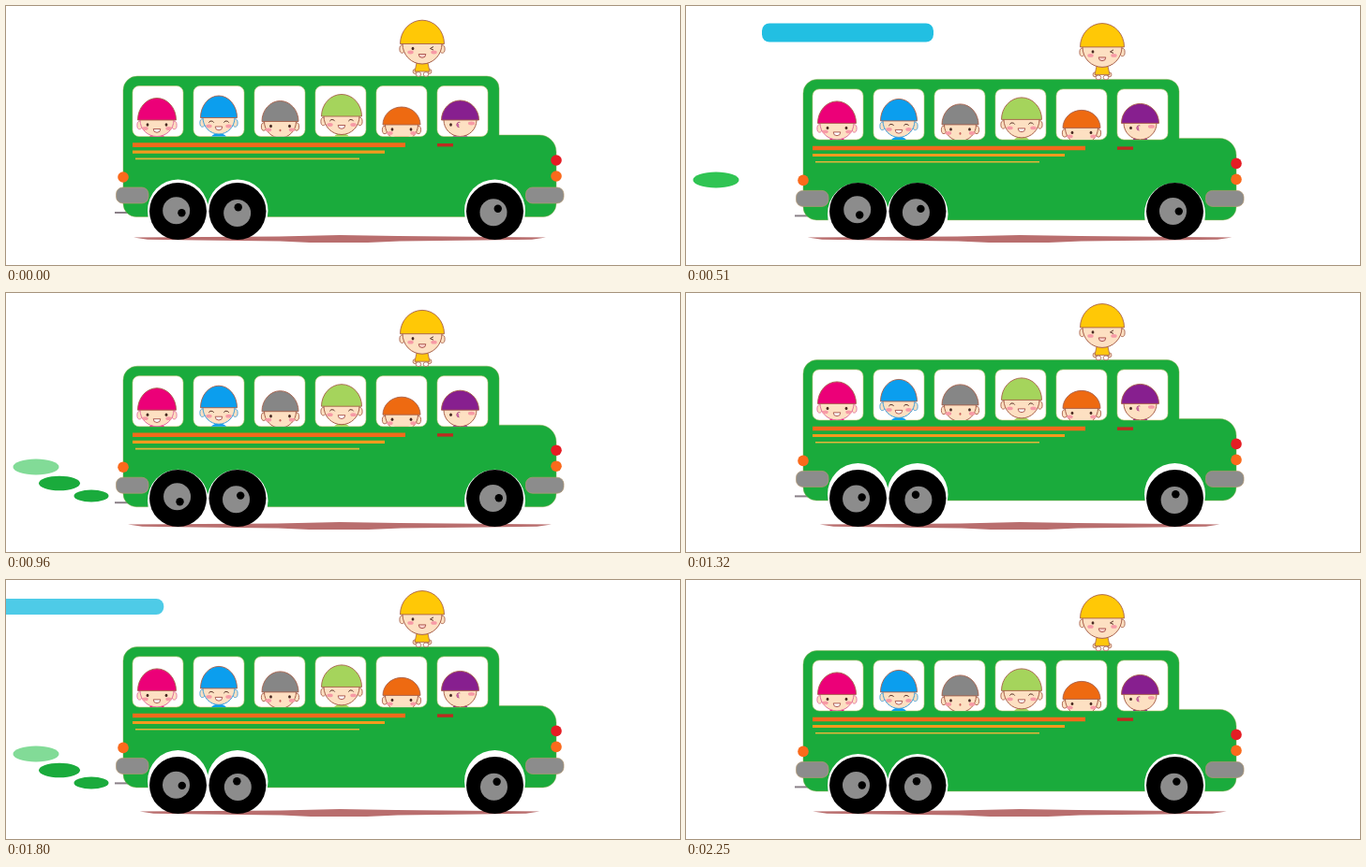
Recreate the animation shown at these times as an HTML page with a canvas. Size 719 px wide and 277 px high, loop 2280 ms.

```html
<!DOCTYPE html>
<html lang="en">
<head>
<meta charset="utf-8">
<title>Bus ride</title>
<style>
html, body { margin: 0; width: 100%; height: 100%; overflow: hidden; background: #fff; }
canvas { display: block; width: 719px; height: 277px; }
</style>
</head>
<body>
<canvas id="stage" width="719" height="277"></canvas>
<script>
const ctx = document.getElementById('stage').getContext('2d');
const STEP = 30, STEPS = 76, BOUNCE = 19, TAU = Math.PI * 2;
const GREEN = '#1aab3c', LINE = '#a8604a', SKIN = '#fde0c2', GREY = '#8c8c8c';

// [step within a bounce, vertical offset]
const BOUNCES = [[0, 0], [1.5, -3], [3, -3.6], [6, -3.6], [7, -3.2], [10, 2], [13, 3.2], [17, 3.4], [18, .4], [19, 0]];
const PUFF_STARTS = [0, 23, 51];
// x, y, half width, half height, fade-in start, fade-out end, colour
const PUFFS = [
  [91, 217, 18.5, 6.5, 1, 13, GREEN],
  [57, 203.5, 22, 7.8, 3, 16, GREEN],
  [32, 186, 24.5, 8.5, 6, 18, '#30c453']
];
// step at which each streak is at x = 81
const STREAKS = [17, 58.55];
const WHEELS = [[183.5, 62], [247, -42], [521.5, -3]];

const clamp = v => Math.max(0, Math.min(1, v));

function along(table, p) {
  const i = table.findIndex(row => row[0] > p);
  const [a, u] = table[i - 1], [b, v] = table[i];
  return u + (v - u) * (p - a) / (b - a);
}

function paint(fill, stroke, width = 1) {
  if (fill) { ctx.fillStyle = fill; ctx.fill(); }
  if (stroke) { ctx.strokeStyle = stroke; ctx.lineWidth = width; ctx.stroke(); }
}

function oval(x, y, rx, ry, fill, stroke, width) {
  ctx.beginPath();
  ctx.ellipse(x, y, rx, ry, 0, 0, TAU);
  paint(fill, stroke, width);
}

function box(x, y, w, h, r, fill, stroke, width) {
  ctx.beginPath();
  ctx.roundRect(x, y, w, h, r);
  paint(fill, stroke, width);
}

function polygon(points, fill, stroke, width) {
  ctx.beginPath();
  points.forEach(p => ctx.lineTo(...p));
  ctx.closePath();
  paint(fill, stroke, width);
}

function curve(x, y, r, from, to, stroke, width) {
  ctx.beginPath();
  ctx.arc(x, y, r, from * Math.PI, to * Math.PI);
  paint(null, stroke, width);
}

function smile(x, y, r, fill) {
  ctx.beginPath();
  ctx.arc(x, y, r, 0, Math.PI);
  ctx.closePath();
  paint(fill, '#9c3b35', .8);
}

const eye = {
  dot: (x, y) => oval(x, y, 1.4, 1.7, '#4a2a22'),
  happy: (x, y) => curve(x, y + 1.5, 3, 1.15, 1.85, '#5b352a', 1),
  wink(x, y) {
    ctx.beginPath();
    ctx.moveTo(x + 2, y - 2);
    ctx.lineTo(x - 1.5, y);
    ctx.lineTo(x + 2, y + 1.5);
    paint(null, '#5b352a', 1);
  }
};

const mouths = {
  smile: (x, y) => smile(x, y, 3.8, '#fff'),
  laugh: (x, y) => smile(x, y + 1.5, 3.8, '#fbd3cd'),
  small: (x, y) => oval(x, y, 1, 1.3, '#c9625a'),
  none() {}
};

function frontFace({ x, brim, eyes = ['dot', 'dot'], mouth = 'smile', gap = 10 }) {
  for (const side of [-1, 1]) oval(x + side * (gap + 2.5), brim + 9, 3.2, 1.9, '#f79aa6');
  eye[eyes[0]](x - gap, brim + 5);
  eye[eyes[1]](x + gap, brim + 5);
  mouths[mouth](x, brim + 9.5);
}

function sideFace({ x, brim }) {
  oval(x - 10, brim + 5, 1.4, 1.7, '#4a2a22');
  oval(x + 12, brim + 3.5, 3.6, 1.9, '#f79aa6');
  curve(x - 1, brim + 5, 2.6, .5, 1.6, '#a33a78', 1);
  oval(x - 2.5, brim + 5.5, 1.3, 1.8, '#c965a0');
}

function kid(k) {
  const { x, top, brim, half, cap, strap = LINE, chin = 17.5, face = frontFace } = k;
  if (face === frontFace) {
    for (const side of [-1, 1]) oval(x + side * (half - 2), brim + 5.5, 2.6, 4.2, SKIN, strap, .9);
  }
  oval(x, brim, half - 2.5, chin, SKIN, strap, 1);
  face(k);
  ctx.beginPath();
  ctx.ellipse(x, brim, half, brim - top, 0, Math.PI, TAU);
  ctx.closePath();
  paint(cap, LINE, .9);
}

const RIDERS = [
  { x: 161, top: 98.5, brim: 122, half: 20.5, cap: '#ec0078', strap: '#e0709c' },
  { x: 227, top: 96, brim: 119.5, half: 19.5, cap: '#0b9eee', strap: '#3f9fd8', eyes: ['happy', 'happy'], gap: 8 },
  { x: 292.5, top: 101.5, brim: 123.5, half: 19.5, cap: '#868686', mouth: 'small' },
  { x: 358, top: 94.5, brim: 118, half: 21.5, cap: '#a5d45c', eyes: ['happy', 'happy'], chin: 19.5 },
  { x: 422, top: 108, brim: 127, half: 20, cap: '#ee6a11', mouth: 'none' },
  { x: 484.5, top: 101, brim: 122, half: 20, cap: '#871f8f', face: sideFace }
];

function roofKid() {
  for (const side of [-1, 1]) {
    oval(444 + side * 8, 70, 1.9, 2.4, SKIN, LINE, .8);
    oval(444 + side * 4, 73, 2.8, 2.4, '#fff', LINE, .8);
  }
  polygon([[438, 61], [450, 61], [452, 70], [436, 70]], '#fdc70c', LINE, .8);
  kid({ x: 444, top: 15.2, brim: 40.5, half: 23.5, cap: '#ffc806', chin: 21.5, eyes: ['dot', 'wink'], mouth: 'laugh' });
}

function bus() {
  box(116, 220, 16, 2, 0, '#8a8088');
  ctx.beginPath();
  ctx.moveTo(125, 90);
  ctx.arcTo(125, 75, 140, 75, 15);
  ctx.arcTo(526, 75, 526, 90, 13);
  ctx.lineTo(526, 138);
  ctx.arcTo(587, 138, 587, 160, 18);
  ctx.arcTo(587, 225.5, 560, 225.5, 14);
  ctx.arcTo(125, 225.5, 125, 200, 14);
  ctx.closePath();
  paint(GREEN, '#8fae55', .5);

  for (const [x] of WHEELS) oval(x, 219, 32.5, 33.5, '#fff');

  RIDERS.forEach((rider, i) => {
    box(135 + 65 * i, 85.5, 54, 54, 7, '#fff', '#d3c983', .6);
    ctx.save();
    ctx.clip();
    oval(rider.x, 143, 9, 7, rider.cap);
    kid(rider);
    ctx.restore();
  });

  box(135, 146.3, 291, 4.6, 0, '#f26a1b');
  box(135, 154.5, 269, 3.2, 0, '#f39a1e');
  box(138, 162.5, 239, 1.7, 0, '#e3b53a');
  box(460, 147, 17, 3.4, 0, '#bd2a20');

  oval(587, 165, 5.8, 5.8, '#e51c24');
  oval(587, 182, 5.8, 5.8, '#fa6a1c');
  oval(125, 183, 5.8, 5.8, '#fa6a1c');
  box(117.5, 194, 34.5, 17, 7, GREY, '#b59a72', .7);
  box(554.5, 194, 40.5, 17, 7, GREY, '#b59a72', .7);
  roofKid();
}

function wheel(x, turn) {
  const c = Math.cos(turn), s = Math.sin(turn);
  oval(x, 219.5, 30.5, 30.5, '#000');
  oval(x - c * 2, 219.5 - s * 2, 14.5, 14.5, GREY);
  oval(x + c * 4.3, 219.5 + s * 4.3, 4.2, 4.2, '#000');
}

function shadow(dy) {
  ctx.save();
  ctx.translate(356, 249);
  ctx.scale(1 + dy * .0085, 1);
  polygon([[-220, -1.5], [-65, -2.5], [0, -4], [62, -3], [220, -1.5], [205, .8], [150, 1.5], [64, 2.5],
    [30, 4], [-32, 4], [-64, 2.5], [-150, 1.5], [-205, .8]], '#b96e6e');
  ctx.restore();
}

function streak(n, ref) {
  const x = 81 - 66 * (n - ref);
  if (x > 719 || x < -183) return;
  const far = clamp((81 - x) / 96), h = 20 - 3 * far;
  ctx.globalAlpha = 1 - .2 * far;
  box(x, 28.5 - h / 2, 183, h, 8, '#22bfe2');
  ctx.globalAlpha = 1;
}

function puffs(n) {
  const p = n - PUFF_STARTS.filter(s => s <= n).pop();
  for (const [x, y, rx, ry, from, to, colour] of PUFFS) {
    ctx.globalAlpha = Math.min(clamp((p - from) / 5), clamp(to - p));
    if (ctx.globalAlpha > 0) oval(x, y, rx, ry, colour);
  }
  ctx.globalAlpha = 1;
}

function draw(n) {
  const dy = along(BOUNCES, n % BOUNCE);
  ctx.fillStyle = '#fff';
  ctx.fillRect(0, 0, 719, 277);
  STREAKS.forEach(ref => streak(n, ref));
  puffs(n);
  ctx.save();
  ctx.translate(0, dy);
  bus();
  ctx.restore();
  shadow(dy);
  for (const [x, lead] of WHEELS) wheel(x, (lead - 38) * TAU / 360 + TAU * 5 * n / STEPS);
}

const begin = performance.now();
function tick() {
  draw(Math.floor((performance.now() - begin) / STEP) % STEPS);
  requestAnimationFrame(tick);
}
tick();
</script>
</body>
</html>
```
